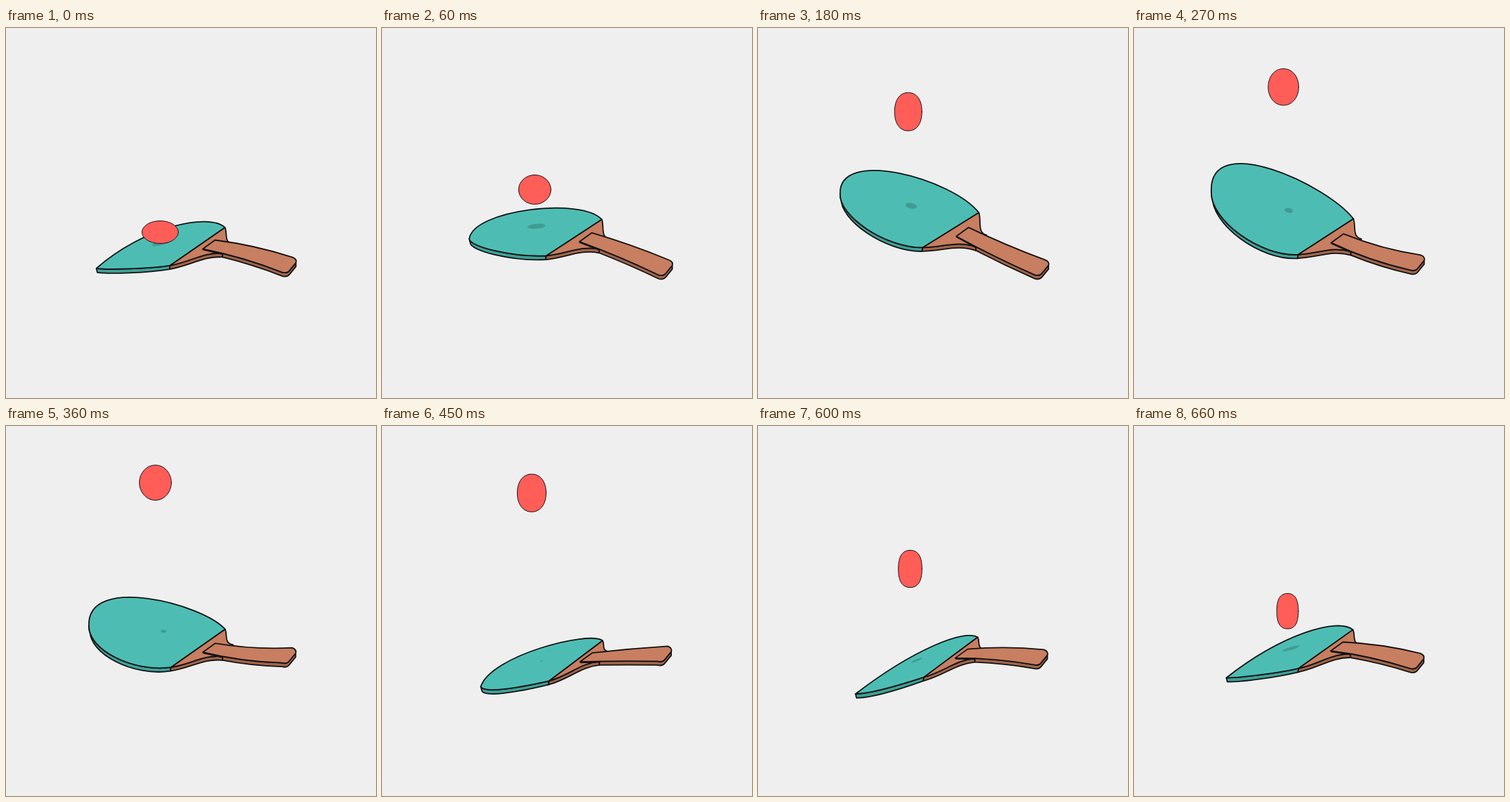
These frames come from a looping animation (540 by 540 pixels, 0.69 s). An HTML page with a canvas:

```html
<!DOCTYPE html>
<html lang="en">
<head>
<meta charset="utf-8">
<title>Table tennis bounce</title>
<style>
html, body { margin: 0; height: 100%; overflow: hidden; background: #efefef; }
canvas { display: block; }
</style>
</head>
<body>
<canvas id="stage" width="540" height="540"></canvas>
<script>
const LOOP = 690, STEP = 30, APEX = 335, THICK = 5.5;
const INK = '#111', TEAL = '#4dbdb4', TEAL_SIDE = '#3f9f97', WOOD = '#c87e60', WOOD_SIDE = '#a06549';
const ctx = document.getElementById('stage').getContext('2d');

const add = (p, x, y) => [p[0] + x, p[1] + y];
const mix = (a, b, t) => [a[0] + (b[0] - a[0]) * t, a[1] + (b[1] - a[1]) * t];
const down = (...points) => points.map(p => add(p, 0, THICK));

// Each command is a list of points: 1 = line, 2 = quadratic, 3 = cubic
function shape(start, commands, fill, width = 1.8) {
  ctx.beginPath();
  ctx.moveTo(...start);
  for (const points of commands) {
    const name = ['lineTo', 'quadraticCurveTo', 'bezierCurveTo'][points.length - 1];
    ctx[name](...points.flat());
  }
  if (fill) {
    ctx.closePath();
    ctx.fillStyle = fill;
    ctx.fill();
  }
  ctx.lineWidth = width;
  ctx.strokeStyle = INK;
  ctx.stroke();
}

// Swing lowers the whole paddle; flex bends the blade down and the handle up
function paddleMotion(time) {
  const wave = (n, peak) => Math.cos(2 * Math.PI * n * (time - peak) / LOOP);
  const swing = wave(1, 500);
  const flex = wave(1, 630) + .18 * wave(2, 125) + .1 * wave(3, 0);
  return { swing, flex, arc: swing * swing, tilt: flex + .25 * swing };
}

// The ball hangs at the apex, stretches with speed and squashes on impact
function ballMotion(time) {
  const u = time < APEX ? 1 - time / APEX : (time - APEX) / (LOOP - APEX);
  const fall = u ** 3 * (2.6 - 1.6 * u);
  const squash = Math.exp(-((time / 85) ** 2));
  return {
    x: 218 + 7 * fall,
    y: 82.5 + 215.5 * fall,
    rx: 24 - 9 * u + 11.5 * squash,
    ry: 25 + 3 * Math.sin(Math.PI * u) - 8.5 * squash
  };
}

function drawBlade({ swing, flex, arc, tilt }, top, low) {
  const pinch = Math.max(0, tilt - .3) / .6, open = Math.max(0, -tilt);
  const tip = [125.7 + 10.5 * swing + 9 * flex + 9 * arc, 319.7 + 57 * swing + 48 * flex];
  const c1 = add(top, -28 + 7 * swing + 7 * flex, -30 + 14 * swing + 12 * flex);
  const c2 = add(tip, 87 * pinch - 3, -40 - 25 * pinch - 40 * open);
  const c3 = add(tip, 25 * pinch - 2, 18 - 20 * tilt);
  const c4 = add(low, 25 * pinch - 55, 6 + 6 * swing);
  const edge = [add(c3, 1, 6), add(c4, 0, 6), add(low, -1, THICK)];
  shape(tip, [[add(tip, 1.5, 6)], edge, [low], [c4, c3, tip]], TEAL_SIDE);
  shape(top, [[c1, c2, tip], [c3, c4, low]], TEAL);
}

function drawShadow({ swing, flex, tilt }, ball) {
  const y = 305 + 38.4 * swing + 17.7 * flex;
  const rx = 16 - .055 * (y - ball.y);
  ctx.beginPath();
  ctx.ellipse(228.5 + 5 * swing, y, rx, rx * (.35 - .2 * tilt), -.1 - .2 * (swing + flex), 0, 7);
  ctx.fillStyle = '#429b93';
  ctx.fill();
}

function drawHandle({ swing, flex, arc }, top, low) {
  const plate = [287 + 2.5 * arc, 325 + 21 * swing + flex], corner = add(plate, 18, -13);
  const far = [425 - swing, 333 - 10.3 * swing + 3.5 * flex], near = add(far, -15, 21);
  const farIn = add(far, -7, -3), farOut = add(far, -2, 5);
  const nearOut = add(near, 4, -5), nearIn = add(near, -7, -2);
  const bow = (p, q) => add(mix(p, q, .5), 0, -6.6 * flex);
  const topBow = bow(corner, farIn), frontBow = bow(plate, nearIn);
  const sideBow = mix(frontBow, nearIn, .25);
  const joint = mix(mix(plate, frontBow, .25), sideBow, .25);

  // Neck between blade and handle
  const drop = low[1] - joint[1];
  const w1 = add(low, 30, -.3 * drop), w2 = add(joint, -28, .45 * drop - 10);
  const neck = mix(corner, far, .22), rise = neck[1] - top[1];
  shape(low, [[add(low, -1, THICK)], down(w1, w2, joint), [joint], [w2, w1, low]], WOOD_SIDE);
  shape(top, [[add(top, 4, .36 * rise), add(neck, -14, -.1 * rise), neck], [joint], [w2, w1, low]], WOOD);

  shape(joint, [down(joint), down(sideBow, nearIn), down(near, nearOut), down(farOut), [farOut],
    [nearOut], [near, nearIn], [sideBow, joint]], WOOD_SIDE);
  shape(add(plate, 1, 1), [[add(joint, 0, 1)]], null, 2.2);
  shape(corner, [[topBow, farIn], [far, farOut], [nearOut], [near, nearIn], [frontBow, plate]], WOOD);
}

function drawBall({ x, y, rx, ry }) {
  // Stretched balls have squarer shoulders
  const k = .55 + .25 * Math.max(0, ry / rx - 1.1);
  const at = (u, v) => [x + u * rx, y + v * ry];
  const quarters = [[1, 0], [0, 1], [-1, 0], [0, -1]].map(([c, s]) =>
    [at(c - k * s, s + k * c), at(k * c - s, k * s + c), at(-s, c)]);
  shape(at(1, 0), quarters, '#ff5d58', 1);
}

function draw() {
  const time = Math.floor(performance.now() % LOOP / STEP) * STEP;
  const motion = paddleMotion(time), ball = ballMotion(time);
  const { swing, flex, arc } = motion;
  const top = [319.5 + 3 * arc, 292.6 + 22.4 * swing + 2.6 * flex];
  const low = [240 + 2 * swing + 2.5 * arc, 347.8 + 26.4 * swing + 3.5 * flex];

  ctx.fillStyle = '#efefef';
  ctx.fillRect(0, 0, 540, 540);
  ctx.lineJoin = ctx.lineCap = 'round';
  drawBlade(motion, top, low);
  drawShadow(motion, ball);
  drawHandle(motion, top, low);
  drawBall(ball);
  requestAnimationFrame(draw);
}
draw();
</script>
</body>
</html>
```
